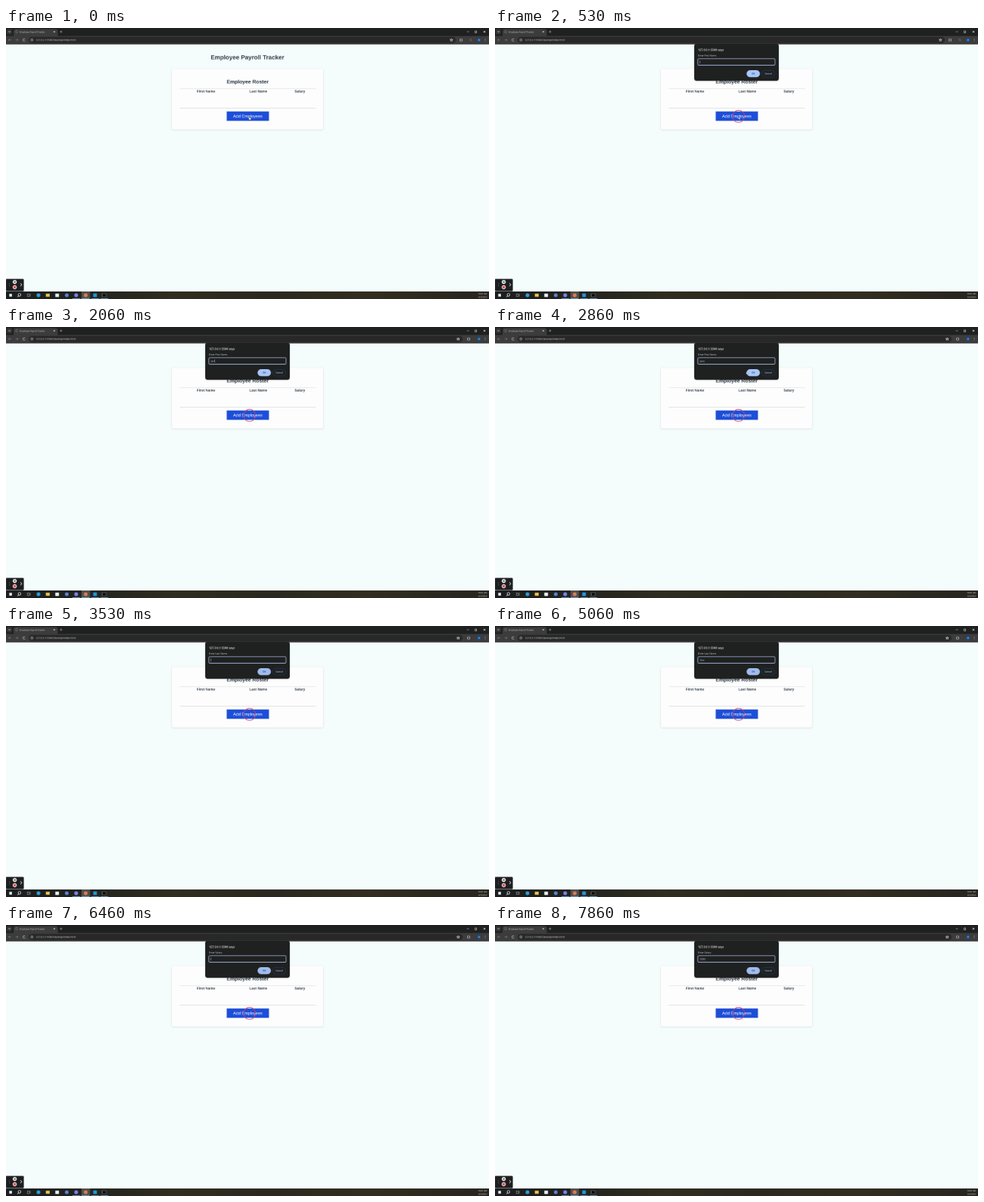
These frames come from a looping animation (640x360 px, 8000 ms). An HTML page with a canvas:

```html
<!DOCTYPE html>
<html lang="en">
<head>
<meta charset="utf-8">
<title>Employee Payroll Tracker</title>
<style>
html, body { margin: 0; width: 100%; height: 100%; overflow: hidden; background: #f4fcfc; }
canvas { display: block; width: 640px; height: 360px; }
</style>
</head>
<body>
<canvas id="stage"></canvas>
<script>
const LOOP = 8000;
const CLICK = 260;
const ZOOM_HIDE = 2000;
const SS = 3; // the desktop is drawn at full HD and scaled down
const ARIAL = '"Liberation Sans", Arial, sans-serif';
const UI = '"Open Sans", "Noto Sans", sans-serif';
const PROMPTS = [
  { open: 430, label: 'Enter First Name', value: 'Jane', keys: [1460, 1700, 1980, 2260] },
  { open: 3130, label: 'Enter Last Name', value: 'Doe', keys: [3900, 4180, 4460] },
  { open: 6060, label: 'Enter Salary', value: '5000', keys: [6660, 6860, 7060, 7260] }
];

const stage = document.getElementById('stage');
const ratio = window.devicePixelRatio || 1;
stage.width = 640 * ratio;
stage.height = 360 * ratio;
const out = stage.getContext('2d');
out.imageSmoothingQuality = 'high';

const desktop = document.createElement('canvas');
desktop.width = 640 * SS;
desktop.height = 360 * SS;
const ctx = desktop.getContext('2d');
ctx.scale(SS, SS);

function box(x, y, w, h, fill, r = 0, stroke, width = 0.5) {
  ctx.beginPath();
  ctx.roundRect(x, y, w, h, r);
  paint(fill, stroke, width);
}

function dot(x, y, r, fill, stroke, width = 0.5) {
  ctx.beginPath();
  ctx.arc(x, y, r, 0, Math.PI * 2);
  paint(fill, stroke, width);
}

function path(points, stroke, width = 0.6, fill) {
  ctx.beginPath();
  points.forEach(([x, y], i) => i ? ctx.lineTo(x, y) : ctx.moveTo(x, y));
  if (fill) ctx.closePath();
  paint(fill, stroke, width);
}

function paint(fill, stroke, width) {
  if (fill) { ctx.fillStyle = fill; ctx.fill(); }
  if (stroke) { ctx.strokeStyle = stroke; ctx.lineWidth = width; ctx.stroke(); }
}

// Text is set in desktop pixels so that glyphs keep their natural spacing.
function text(str, x, y, size, color, font = UI, weight = 400, align = 'left') {
  ctx.save();
  ctx.setTransform(1, 0, 0, 1, 0, 0);
  ctx.font = `${weight} ${size * SS}px ${font}`;
  ctx.textRendering = 'geometricPrecision';
  ctx.textAlign = align;
  ctx.fillStyle = color;
  ctx.fillText(str, x * SS, y * SS);
  const width = ctx.measureText(str).width / SS;
  ctx.restore();
  return width;
}

function shadow(alpha, blur, dy) {
  ctx.shadowColor = `rgba(0,0,0,${alpha})`;
  ctx.shadowBlur = blur * SS;
  ctx.shadowOffsetY = dy * SS;
}

function cross(x, y, r, color) {
  path([[x - r, y - r], [x + r, y + r]], color);
  path([[x + r, y - r], [x - r, y + r]], color);
}

function lens(x, y, color) {
  dot(x - 0.4, y - 0.4, 1.2, null, color);
  path([[x + 0.5, y + 0.5], [x + 1.6, y + 1.6]], color);
}

function star(x, y, r) {
  const points = [];
  for (let i = 0; i <= 10; i++) {
    const a = -Math.PI / 2 + i * Math.PI / 5;
    const d = i % 2 ? r * 0.45 : r;
    points.push([x + d * Math.cos(a), y + d * Math.sin(a)]);
  }
  path(points, '#dcdcdc', 0.6);
}

function drawBrowser(zoomed) {
  box(0, 0, 640, 11, '#1f2020');
  box(1, 1.5, 7, 7, '#343535', 2);
  path([[3.4, 4.4], [4.6, 5.6], [5.8, 4.4]], '#ddd');
  box(10, 1.5, 58.5, 11, '#3c3c3c', 2.5);
  dot(14, 5.1, 1.4, null, '#8a8c8f');
  text('Employee Payroll Tracker', 18, 6.2, 2.9, '#e3e3e3');
  cross(64, 5, 0.9, '#d5d5d5');
  path([[71.5, 5], [74.5, 5]], '#d5d5d5');
  path([[73, 3.5], [73, 6.5]], '#d5d5d5');
  path([[610.5, 5], [613.5, 5]], '#e8e8e8');
  box(621.4, 4, 2.3, 2.3, null, 0.3, '#e8e8e8');
  cross(634, 5, 1.2, '#e8e8e8');

  box(0, 10.5, 640, 11.3, '#3c3c3c');
  path([[7, 15.9], [3.5, 15.9]], '#777');
  path([[5, 14.4], [3.5, 15.9], [5, 17.4]], '#777');
  path([[12.5, 15.9], [16, 15.9]], '#777');
  path([[14.5, 14.4], [16, 15.9], [14.5, 17.4]], '#777');
  ctx.beginPath();
  ctx.arc(24, 15.9, 1.6, 0.4, 5.6);
  paint(null, '#ccc', 0.6);

  const edge = zoomed ? 596 : 605;
  box(30, 11.8, edge - 30, 8.4, '#282828', 4.2);
  dot(34.3, 15.9, 2.6, '#3c3c3c');
  dot(34.3, 15.9, 1.2, null, '#d0d0d0');
  text('127.0.0.1:5500/Develop/index.html', 39.5, 17.1, 3.25, '#e3e3e3');
  star(edge - 5.8, 15.9, 1.9);
  box((zoomed ? 603 : 613) - 1.4, 14.6, 2.8, 2.8, null, 0.5, '#cfcfcf', 0.6);
  if (zoomed) lens(616, 15.9, '#777');
  dot(626.8, 15.9, 2.6, '#1a4f8f');
  dot(626.8, 15.9, 1.1, '#4f9be0');
  for (const y of [14.5, 15.9, 17.3]) dot(635, y, 0.4, '#d5d5d5');
}

function drawPage() {
  box(0, 21.7, 640, 328.5, '#f4fcfc');
  text('Employee Payroll Tracker', 320, 41.8, 8, '#2f3b48', ARIAL, 700, 'center');
  ctx.save();
  shadow(0.12, 2, 0.6);
  box(220, 54.3, 200, 80.4, '#fdfdfd', 1.5);
  ctx.restore();
  text('Employee Roster', 320.2, 73.5, 6.8, '#2f3b48', ARIAL, 700, 'center');
  box(230, 80.2, 180.5, 0.6, '#dfe2e4');
  box(230, 106, 180.5, 0.6, '#d5d8da');
  [['First Name', 265], ['Last Name', 334.3], ['Salary', 389.3]].forEach(([name, x]) =>
    text(name, x, 85.5, 4.67, '#2f3b48', ARIAL, 700, 'center'));
  box(292.4, 110.8, 56, 12.6, '#1d4ed8');
  text('Add Employees', 320.4, 119.1, 5.55, '#fff', ARIAL, 400, 'center');
}

function drawRecorder() {
  box(0, 333.5, 23.5, 16, '#1d1e20', 1.2, '#4b4d50', 0.5);
  for (const y of [339.2, 341, 342.8]) dot(4.5, y, 0.45, '#8c8c8c');
  dot(11.6, 337.4, 2.7, '#e9e9e9');
  box(10.8, 336.5, 1.7, 1.8, '#333');
  dot(11.6, 344.3, 2.7, '#f0dede');
  dot(11.6, 344.3, 1.6, '#e03b3b');
  path([[19.2, 339], [20.8, 341], [19.2, 343]], '#e5e5e5', 0.7);
}

function drawTaskbar() {
  const g = ctx.createLinearGradient(0, 0, 640, 0);
  [[0, '#1b1e1f'], [0.2, '#24251f'], [0.35, '#302e1f'], [0.55, '#2b291f'],
   [0.75, '#322e20'], [1, '#26251f']].forEach(([at, c]) => g.addColorStop(at, c));
  box(0, 350, 640, 10, g);
  box(100, 350, 11.5, 10, '#4f4f4a');
  box(4.3, 353.2, 3.6, 3.6, '#e9eef2');
  dot(17.9, 354.4, 1.8, null, '#eee', 0.7);
  path([[16.6, 355.8], [15.2, 357.4]], '#eee', 0.7);
  box(28.2, 353.5, 2.6, 3, null, 0, '#a9a9a9');
  path([[32, 353.2], [32, 356.8]], '#a9a9a9');
  dot(43, 355, 2.6, '#2a9fd6');
  box(52.7, 353, 5.2, 4, '#f3c64b', 0.4);
  box(65.4, 352.8, 4.8, 4.6, '#eceff1', 0.4);
  dot(80.5, 355, 2.5, '#5a86d0');
  dot(93, 355, 2.6, '#7d82ee');
  dot(105.6, 355, 2.6, '#dd7a55');
  box(115.6, 352.6, 4.8, 4.8, '#2495dc', 0.5);
  box(127.6, 353, 5.2, 4, '#0c0c0c', 0.2, '#b5b5b5', 0.4);
  for (const x of [88, 100, 113, 125]) box(x, 359.3, 10.5, 0.7, '#79b6e6');
  text('10:21 AM', 637.2, 353.9, 2.7, '#f0f0f0', UI, 400, 'right');
  text('6/2/2024', 637.2, 358.3, 2.7, '#f0f0f0', UI, 400, 'right');
}

function drawPrompt(p, t) {
  ctx.save();
  shadow(0.3, 1.5, 0.3);
  box(264, 20.8, 112, 49.3, '#1f2020', 3);
  ctx.restore();
  text('127.0.0.1:5500 says', 269, 30.2, 3.72, '#f0f0f0', UI, 600);
  text(p.label, 269, 37.7, 3.1, '#e3e3e3');
  box(268.8, 40.8, 102.2, 8.7, '#1f2020', 1.4, '#b3cdf8', 0.8);

  const pressed = p.keys.filter(k => k <= t);
  const width = text(p.value.slice(0, pressed.length), 271.6, 46.2, 3.1, '#e3e3e3');
  const since = t - (pressed.length ? pressed[pressed.length - 1] : p.open);
  if (since % 1000 < 500) box(271.6 + (pressed.length ? width : 0), 43.4, 0.4, 3.6, '#dcdcdc');

  const hovered = p !== PROMPTS[0];
  box(333.4, 56, 17.6, 9.4, hovered ? '#9fbcec' : '#a8c7fa', 4.7);
  text('OK', 342.2, 61.8, 3, '#062e6f', UI, 600, 'center');
  box(353.6, 56.2, 17, 9, null, 4.5, '#1b4468', 0.5);
  text('Cancel', 362.1, 61.8, 3, '#a8c7fa', UI, 600, 'center');
}

function glide(t, from, to, a, b) {
  const k = Math.min(1, Math.max(0, (t - from) / (to - from)));
  const e = k * k * (3 - 2 * k);
  return [a[0] + (b[0] - a[0]) * e, a[1] + (b[1] - a[1]) * e];
}

function drawHand(x, y) {
  path([[x - 0.9, y - 2], [x - 0.2, y - 2], [x, y], [x + 1.7, y + 0.5],
    [x + 1.4, y + 2.6], [x - 0.8, y + 2.6], [x - 2, y + 0.6], [x - 0.9, y + 0.9]],
    '#222', 0.3, '#fff');
}

function drawArrow(x, y) {
  path([[x, y], [x, y + 3.4], [x + 0.8, y + 2.7], [x + 1.4, y + 4],
    [x + 2, y + 3.7], [x + 1.4, y + 2.5], [x + 2.4, y + 2.4]], '#333', 0.25, '#fff');
}

function drawPointer(t) {
  const button = [323, 119.3], rest = [310.8, 53.6], ok = [342, 62];
  const [first, second] = PROMPTS;
  if (t < first.open) drawHand(...button);
  else if (t < first.keys[0]) drawArrow(...glide(t, 480, 1100, button, rest));
  else if (t >= 2500 && t < second.open) drawArrow(...glide(t, 2500, 3060, rest, ok));
}

function draw(t) {
  const prompt = PROMPTS.filter(p => p.open <= t).pop();
  drawPage();
  drawBrowser(t < ZOOM_HIDE);
  drawRecorder();
  drawTaskbar();
  if (t >= CLICK) {
    const r = 8 * Math.min(1, (t - CLICK) / 150);
    dot(322.7, 117.4, r, null, '#d8405c', 0.8);
  }
  if (prompt) drawPrompt(prompt, t);
  drawPointer(t);
  out.drawImage(desktop, 0, 0, stage.width, stage.height);
}

function tick() {
  draw(performance.now() % LOOP);
  requestAnimationFrame(tick);
}
tick();
</script>
</body>
</html>
```
